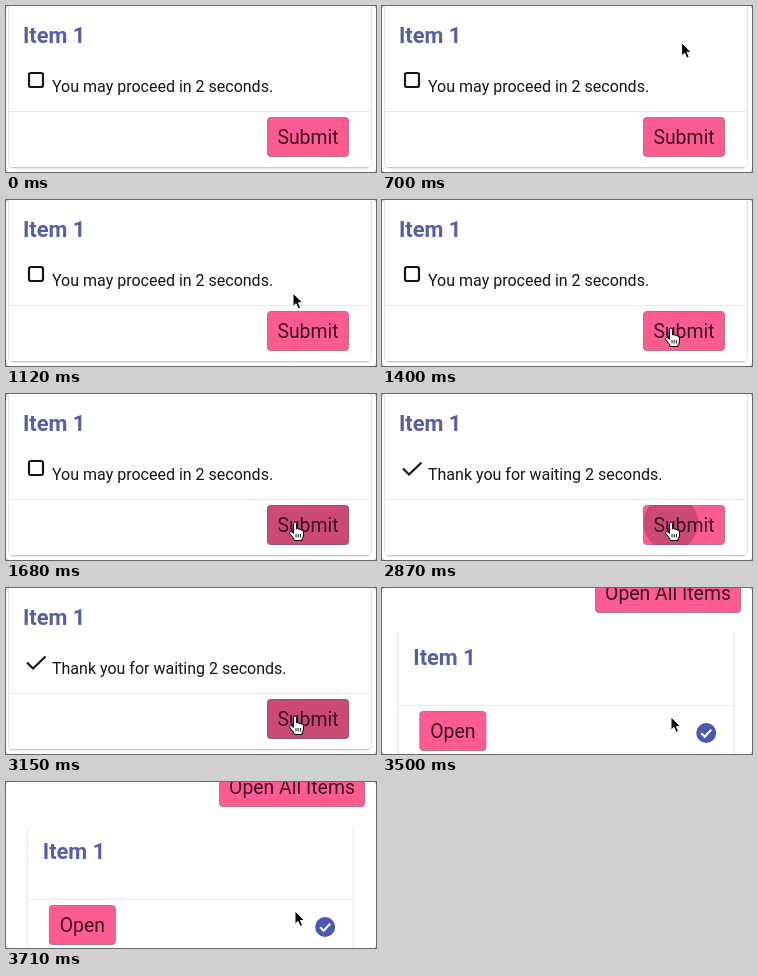
An HTML page for the animation above (5040 ms loop, 370 px wide and 166 px high).

```html
<!DOCTYPE html>
<html lang="en">
<head>
<meta charset="utf-8">
<title>Timed item</title>
<style>
  html, body { margin: 0; width: 100%; height: 100%; overflow: hidden; background: #b8b8b8; }
  svg { display: block; width: 370px; height: 166px; font-family: Roboto, sans-serif; }
  .page { fill: #fff; }
  .line { fill: none; stroke: #e6e6e6; }
  .title { font-size: 21.8px; font-weight: 700; fill: #545fa6; }
  .body { font-size: 16px; fill: #151515; }
  .button rect { fill: #fc5c8f; stroke: #b9737f; }
  .button text { font-size: 19.4px; fill: #3c1420; text-anchor: middle; }
  .tick { fill: none; stroke: #151515; stroke-width: 2.2; }
</style>
</head>
<body>
<svg viewBox="0 0 370 166">
  <defs>
    <clipPath id="submitClip"><rect x="261" y="111" width="82" height="40" rx="3"/></clipPath>
  </defs>
  <rect class="page" width="370" height="166" rx="3"/>

  <g id="form">
    <path d="M4 161.5H363" stroke="#c9c9c9"/>
    <path d="M4 162.5H363" stroke="#ececec"/>
    <path class="line" d="M2.5 0V158Q2.5 161.5 6 161.5M365.5 0V158Q365.5 161.5 362 161.5M3 105.5H365"/>
    <text class="title" x="17" y="37">Item 1</text>
    <rect id="box" class="tick" x="23" y="67" width="14" height="14" rx="2"/>
    <path id="tick" class="tick" d="M21 74.5L27 80.5L39.5 68.5"/>
    <text id="message" class="body" x="46" y="86"></text>
    <g class="button">
      <rect x="261.5" y="111.5" width="81" height="39" rx="3"/>
      <g clip-path="url(#submitClip)"><circle id="ripple" cx="289" cy="129"/></g>
      <text x="302" y="137.5">Submit</text>
    </g>
  </g>

  <g id="list">
    <g class="button">
      <rect x="213.5" y="-14.5" width="145" height="39" rx="3"/>
      <text x="286" y="12">Open All Items</text>
    </g>
    <path id="frame" class="line"/>
    <g id="leftPart">
      <text class="title" x="15" y="77">Item 1</text>
      <g class="button">
        <rect x="21.5" y="123.5" width="66" height="39" rx="3"/>
        <text x="54.5" y="149.7">Open</text>
      </g>
    </g>
    <g id="rightPart">
      <circle cx="-28.5" cy="145" r="10" fill="#4b58ae"/>
      <path d="M-33.5 145.3L-30 148.8L-23.5 141.8" fill="none" stroke="#fff" stroke-width="2"/>
    </g>
  </g>

  <g id="cursor">
    <path id="arrow" d="M0 0V13.2L3 10.4L5.2 15.4L7.6 14.4L5.4 9.5H9.6Z" fill="#000" stroke="#fff"/>
    <g id="hand" fill="#fff" stroke="#000">
      <path d="M-1.6 .5Q-1.6 -1 0 -1Q1.6 -1 1.6 .5V6Q2.6 5 4 6.2Q5.2 5.6 6 7Q8.5 6.6 8.5 9V12Q8.5 14 7 16V17.5H-1V16L-5 11Q-6 9 -4.5 8.5Q-3.3 8.3 -1.6 10.4Z"/>
      <path d="M1 11V14.5M3.2 11V14.5M5.4 11V14.5" stroke-width=".9"/>
    </g>
  </g>
</svg>
<script>
const LOOP = 5040, CHECKED = 1750, SWAP = 3220;
const $ = id => document.getElementById(id);
const show = (id, on) => $(id).setAttribute('visibility', on ? 'inherit' : 'hidden');
const clamp = v => Math.min(1, Math.max(0, v));
const span = (t, from, to) => clamp((t - from) / (to - from));
const mix = (a, b, p) => a + (b - a) * p;
const easeOut = p => 1 - (1 - p) ** 2;

// time, x, y of the pointer tip
const path = [[560, 311, -12], [1050, 288, 87], [1120, 287, 93], [1400, 289, 129]];

function pointerAt(t) {
  if (t <= path[0][0]) return path[0].slice(1);
  const i = path.findIndex(p => p[0] > t);
  if (i < 0) return path[path.length - 1].slice(1);
  const [a, b] = [path[i - 1], path[i]];
  const p = span(t, a[0], b[0]);
  const q = i === 2 ? p : easeOut(p);
  return [mix(a[1], b[1], q), mix(a[2], b[2], q)];
}

function drawRipple(t) {
  const first = t < 2500;
  const grow = easeOut(first ? span(t, 1400, 1660) : span(t, 2790, 3110));
  const fade = first ? 1 - span(t, CHECKED, 2150) : 1;
  $('ripple').setAttribute('r', 62 * grow);
  $('ripple').setAttribute('opacity', 0.2 * fade);
}

function drawList(t) {
  const p = 1 - (1 - span(t, 3300, 3760)) ** 2.2;
  const left = mix(2, 22, p), right = mix(366, 347.5, p);
  $('frame').setAttribute('d',
    `M${left - .5} 44V166M${right - .5} 44V166M${left} 117.5H${right}`);
  $('leftPart').setAttribute('transform', `translate(${left})`);
  $('rightPart').setAttribute('transform', `translate(${right})`);
}

function draw(t) {
  const checked = t >= CHECKED, list = t >= SWAP;
  show('form', !list);
  show('list', list);
  show('box', !checked);
  show('tick', checked);
  $('message').textContent = checked
    ? 'Thank you for waiting 2 seconds.' : 'You may proceed in 2 seconds.';
  drawRipple(t);
  drawList(t);

  const [x, y] = pointerAt(t);
  const hand = y >= 111 && !list;
  show('cursor', t >= 560);
  show('hand', hand);
  show('arrow', !hand);
  $('cursor').setAttribute('transform', `translate(${x} ${y})`);
}

const start = performance.now();
function tick() {
  draw((performance.now() - start) % LOOP);
  requestAnimationFrame(tick);
}
tick();
</script>
</body>
</html>
```
